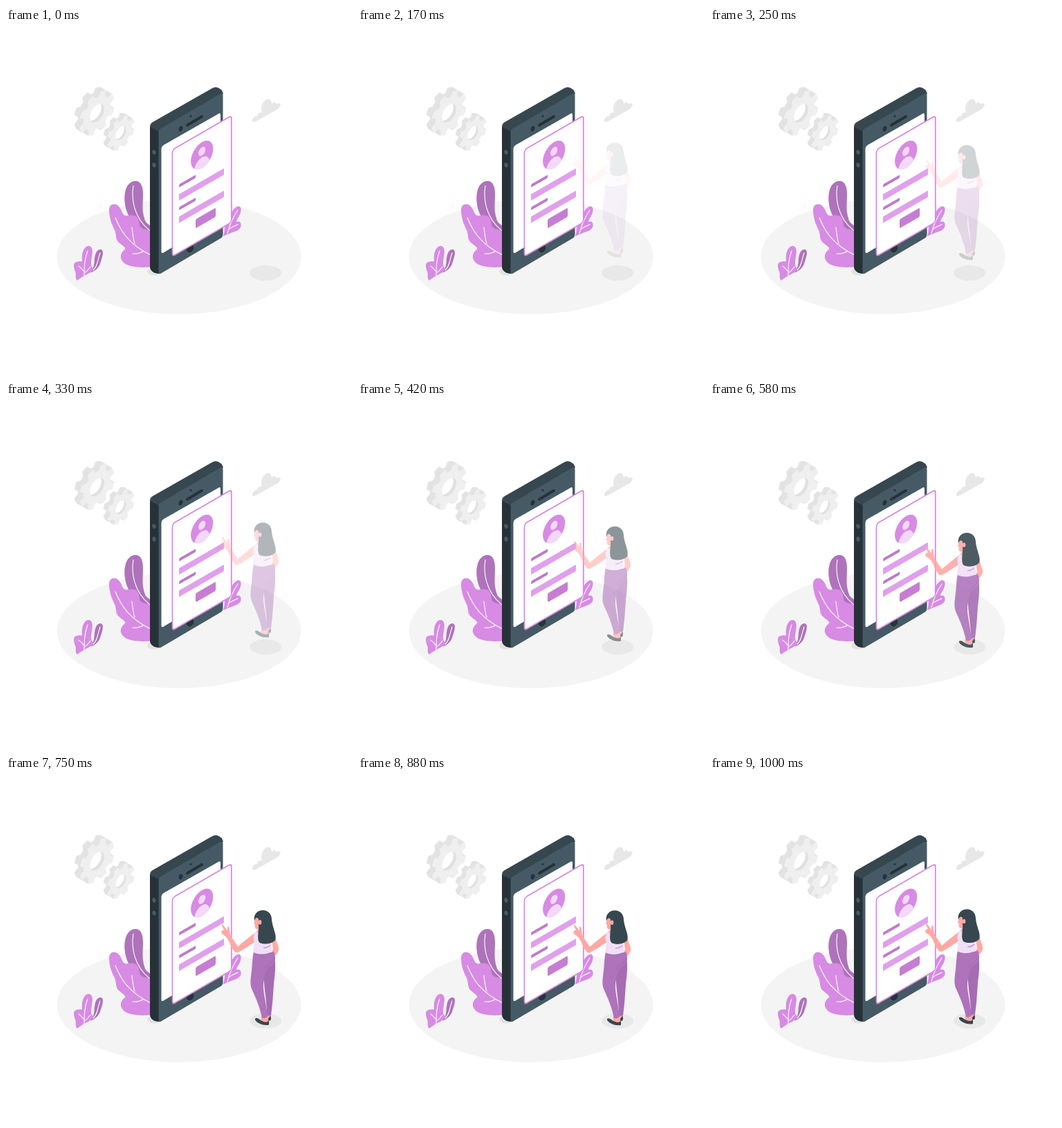
An HTML page for the animation above (1040 ms loop, 500 by 500 pixels).

```html
<!DOCTYPE html>
<html lang="en">
<head>
<meta charset="utf-8">
<title>Sign-up on a phone</title>
<style>
html, body { margin: 0; width: 100%; height: 100%; overflow: hidden; background: #fff; }
svg { display: block; width: 100vw; height: 100vh; }
.vein { fill: none; stroke: #fff; stroke-width: 1.1; stroke-linecap: round; }
.light { fill: #d78be4; }
.dark { fill: #ae73bb; }
.skin { fill: #ffa8a4; }
.ink { fill: #37474f; }
</style>
</head>
<body>
<svg viewBox="0 0 500 500">
  <ellipse cx="250" cy="330.5" rx="176.5" ry="83" fill="#f4f4f4"/>
  <ellipse cx="375" cy="354" rx="23" ry="11" fill="#e8e8e8"/>
  <path d="M204 352C205 348 212 345 220 347L226 354C220 359 206 359 204 352Z" fill="#e2e2e2"/>

  <g id="gears"></g>
  <path d="M357 136C354 133 358 127 363 127C364 123 367 121 370 122C367 113 372 104 378 103C382 102 384 106 384 110C387 106 390 106 390 110C395 107 398 110 396 113C394 117 390 119 386 121L361 135Z" fill="#e7e7e7"/>

  <!-- Large plant -->
  <path class="dark" d="M179 274C172 263 170 248 172 238C174 226 181 221 187 221C195 221 198 229 198 240C198 254 196 263 200 275C201 281 205 283 209 286V298L190 290Z"/>
  <path class="vein" d="M184 228C181 246 184 274 208 293"/>
  <path class="light" d="M149 263C149 255 156 252 162 257C168 262 167 269 172 271C178 272 185 268 190 274C194 279 191 286 196 289C201 292 206 291 210 294V345C198 347 180 346 171 340C163 333 165 325 172 320C174 317 167 314 162 309C158 304 160 299 157 292C153 284 149 275 149 263Z"/>
  <path class="vein" d="M158 274C166 294 178 313 209 328M182 288C183 298 184 306 186 311M183 326C188 327 194 325 198 323"/>

  <!-- Small plants -->
  <path class="dark" d="M122 354C130 345 126 333 130 325C132 320 137 319 139 321C142 326 137 336 136 341C133 348 128 351 122 354Z"/>
  <path class="light" d="M103 365C99 361 102 357 100 352C98 347 96 339 102 338C107 336 109 339 110 336C109 329 111 317 118 315C125 314 126 322 124 331C123 338 122 345 126 347C129 352 112 357 103 365Z"/>
  <path class="vein" d="M118 322C113 335 113 348 113 359M105 344C109 347 111 350 113 352M113 354C117 352 120 348 122 345M136 325C132 337 132 345 126 350"/>
  <path class="light" d="M314 301C317 292 314 285 320 279C324 270 328 261 334 258C338 256 341 260 339 266C338 272 333 276 333 280C338 278 341 282 339 288C336 294 326 295 314 301Z"/>
  <path class="vein" d="M335 263C327 275 322 288 320 297M335 284C330 286 325 288 322 291"/>

  <!-- Phone -->
  <path d="M208 142L221 147V355C214 355 208 351 208 345Z" fill="#263238"/>
  <path d="M208 143Q208 138 212 136L298 87Q303 84 308 87L312 90L314 95L220 149Z" fill="#37474f"/>
  <path d="M220.5 151Q220.5 147 224 145L309 95.500Q313.500 93 313.500 98V298Q313.500 302 310 304L225 354Q220.500 357 220.500 352Z" fill="#455a64"/>
  <path d="M224.500 175Q224.500 171 228 169L307 124Q310 122 310 126V271Q310 275 307 277L227 325Q224.500 326 224.500 323Z" fill="#fff"/>
  <g fill="#263238">
    <ellipse cx="252.500" cy="145.500" rx="2.800" ry="4" transform="rotate(20 252.500 145.500)"/>
    <circle cx="267" cy="127.500" r="1.500"/>
    <ellipse cx="266" cy="318.500" rx="5" ry="6" transform="rotate(30 266 318.500)"/>
  </g>
  <path d="M262 140.500L283 128" stroke="#263238" stroke-width="4" stroke-linecap="round"/>
  <g fill="#455a64">
    <ellipse cx="214" cy="179.500" rx="2.600" ry="3.400" transform="rotate(-20 214 179.500)"/>
    <ellipse cx="214" cy="198" rx="2.600" ry="3.400" transform="rotate(-20 214 198)"/>
  </g>

  <!-- Form card, drawn flat and tilted -->
  <g transform="matrix(.866 -.5 0 1 240.500 176)">
    <rect width="98.500" height="154" rx="4" fill="#fff" stroke="#d488e2" stroke-width="2"/>
    <clipPath id="disc"><circle cx="49.300" cy="32.200" r="18.600"/></clipPath>
    <circle class="light" cx="49.300" cy="32.200" r="18.600"/>
    <g fill="#f3d9f7" clip-path="url(#disc)">
      <circle cx="49.300" cy="27" r="6"/>
      <circle cx="49.300" cy="48" r="12.500"/>
    </g>
    <g fill="#e0a0ec">
      <rect x="11" y="69.700" width="75" height="9.300"/>
      <rect x="11" y="102" width="75" height="9.300"/>
    </g>
    <g fill="#bd7bca">
      <rect x="11" y="55.500" width="28" height="4.500" rx="1.800"/>
      <rect x="11" y="88.500" width="28" height="4.500" rx="1.800"/>
      <rect x="38.700" y="119.800" width="33.500" height="13" rx="2" fill="#c67dd3"/>
    </g>
  </g>

  <g id="woman">
    <path class="skin" d="M377 340H383V350H377ZM369 345L377 344L380 354L368 354Z"/>
    <path class="ink" d="M379 349L382 345Q384 349 382 352L379 352ZM360 349C364 347 366 351 371 353C375 355 378 354 380 352V358C373 360 363 356 360 351Z"/>
    <path class="skin" d="M384 236L390 234C391 240 395 246 394 250C392 256 388 259 385 262L382 256L386 249Z"/>
    <path d="M371 255L386 253C391 264 389 285 387 298C386 316 385 330 383 344Q380 346 377 344C377 326 374 312 373 298Z" fill="#a66cb3"/>
    <path class="dark" d="M358 252C365 257 378 257 387 252C391 262 389 269 382 273C373 279 374 289 372 299C371 309 376 326 378 346Q374 350 370 348C367 333 361 319 355 306C352 298 354 288 355 279C356 270 356 260 358 252Z"/>
    <path d="M388 261C384 270 376 270 374 278" fill="none" stroke="#9a60a8" stroke-width=".7"/>
    <path class="skin" d="M361 224C352 231 343 238 335 245C331 239 327 233 324 228L322.500 217Q321 215 320 217L320 222L313.500 213.500Q311.500 212.500 312 215L315 221C311 221 310 225 313 227C318 230 321 234 323 239C326 247 330 254 334 254C343 250 352 243 360 238Z"/>
    <path d="M363 221C358 226 356 232 359 239L357 253C364 257 377 257 384 252L384 234L372 222Z" fill="#f0dff7"/>
    <path d="M382 243C379 246 376 247 372 247" fill="none" stroke="#c184d0" stroke-width="1.200"/>
    <path class="skin" d="M360 202C359 206 360 208 358 212L360 213C359 217 360 220 364 220L362 224Q367 228 371 224V203Z"/>
    <path class="ink" d="M359 208C357 198 364 192.500 371 192.500C380 192.500 384 199 384 206C385 218 391 226 389.500 235C386 241 372 243 366 239C362 233 366 222 365 214L365 205C362 202 360 204 359 208Z"/>
    <ellipse class="skin" cx="367" cy="210" rx="2.300" ry="3.300"/>
  </g>
</svg>
<script>
const gears = document.getElementById("gears");
const woman = document.getElementById("woman");

// Outline of an eight-toothed wheel, tilted like the card
function wheel(cx, cy, radius) {
  const points = [];
  for (let tooth = 0; tooth < 8; tooth++) {
    for (const [turn, scale] of [[-15, .77], [-9, 1], [9, 1], [15, .77]]) {
      const a = (22.5 + tooth * 45 + turn) * Math.PI / 180;
      const x = radius * scale * Math.cos(a), y = radius * scale * Math.sin(a);
      points.push(`${(cx + .866 * x).toFixed(1)} ${(cy + y - .5 * x).toFixed(1)}`);
    }
  }
  return `M${points.join("L")}Z`;
}

function gear(id, cx, cy, radius, hole, depth) {
  let svg = "";
  for (let d = depth; d > 0; d -= .5) {
    svg += `<path d="${wheel(cx - d, cy - d * .6, radius)}" fill="#e3e3e3"/>`;
  }
  const disc = (x, y, fill, extra = "") =>
    `<g ${extra}><circle r="${hole}" transform="matrix(.866 -.5 0 1 ${x} ${y})" fill="${fill}"/></g>`;
  svg += `<path d="${wheel(cx, cy, radius)}" fill="#efefef"/>`;
  svg += `<clipPath id="${id}"><circle r="${hole}" transform="matrix(.866 -.5 0 1 ${cx} ${cy})"/></clipPath>`;
  svg += disc(cx, cy, "#e0e0e0");
  svg += disc(cx - depth * .5, cy - depth * .3, "#fff", `clip-path="url(#${id})"`);
  gears.innerHTML += svg;
}

gear("bigHole", 131.5, 123, 29.5, 12, 8);
gear("smallHole", 166, 152, 23, 9, 6);

// cubic-bezier(.36, -.01, .5, 1.38): settles after a small overshoot
const bezier = (s, a, b) => 3 * (1 - s) ** 2 * s * a + 3 * (1 - s) * s * s * b + s ** 3;
function ease(x) {
  let low = 0, high = 1;
  for (let i = 0; i < 30; i++) {
    const mid = (low + high) / 2;
    if (bezier(mid, .36, .5) < x) low = mid; else high = mid;
  }
  return bezier(low, -.01, 1.38);
}

const LOOP = 1040, FPS = 24;
const start = performance.now();
function draw() {
  const t = Math.max(0, performance.now() - start) % LOOP;
  const step = Math.min(FPS, Math.floor((t + 4) * FPS / 1000));
  const p = ease(step / FPS);
  woman.setAttribute("opacity", step < 4 ? 0 : Math.min(1, p));
  woman.setAttribute("transform", `translate(0 ${30 * (p - 1)})`);
  requestAnimationFrame(draw);
}
draw();
</script>
</body>
</html>
```
